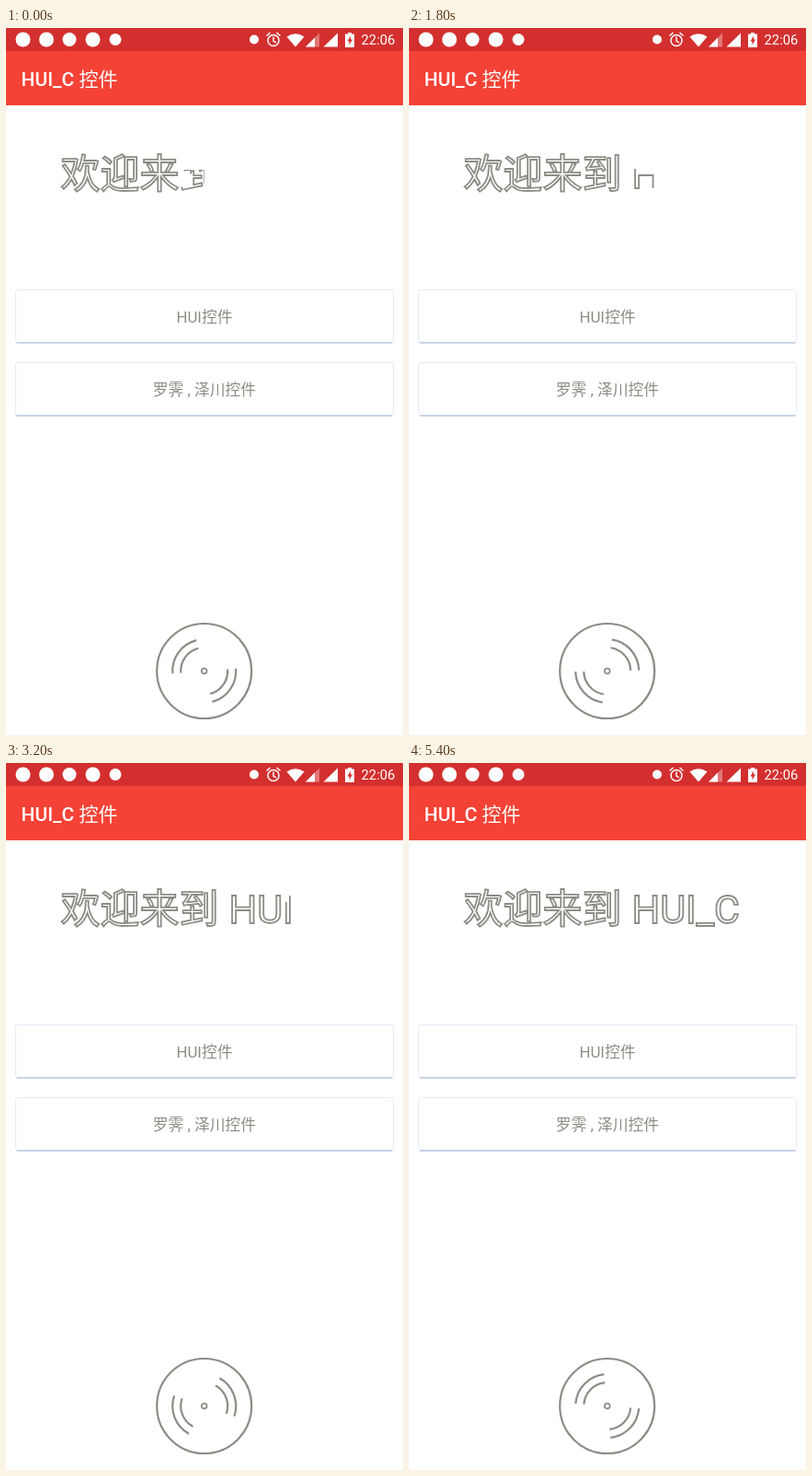
An HTML page for the animation above (5500 ms loop, 432 by 768 pixels).

```html
<!DOCTYPE html>
<html lang="zh-CN">
<head>
<meta charset="utf-8">
<style>
  html, body { margin: 0; width: 100%; height: 100%; overflow: hidden; background: #fff; }
  svg { display: block; }
  text { font-family: Roboto, "Noto Sans CJK SC", "Noto Sans CJK", sans-serif; white-space: pre; }
  .label { font-size: 16.8px; fill: #8c8c82; text-anchor: middle; }
  .line { fill: none; stroke: #8c8c84; }
  .title { font-size: 43px; stroke-width: 1.8; }
  .white { fill: #fff; }
  .thin { fill: none; stroke: #fff; stroke-width: 1.5; }
  .card { fill: #fff; stroke: #e6ebf5; }
  .shade { fill: none; stroke: #bccbe2; stroke-width: 1.5; }
</style>
</head>
<body>
<svg width="432" height="768" viewBox="0 0 432 768">
  <rect width="432" height="25.5" fill="#d32f2f"/>
  <rect y="25" width="432" height="59" fill="#f44336"/>

  <g class="white">
    <circle cx="18.5" cy="12.5" r="8"/>
    <circle cx="44" cy="12.5" r="8"/>
    <circle cx="69" cy="12.5" r="7.5"/>
    <circle cx="94.5" cy="12.5" r="8"/>
    <circle cx="119" cy="12.5" r="6.5"/>
    <circle cx="270" cy="12.5" r="5"/>
    <path d="M305.500 9.500Q315 3 324.500 9.500L315 20.500Z"/>
    <path d="M326 20.500L341 5.500V20.500Z" opacity=".35"/>
    <path d="M326 20.500L336 10.500V20.500Z"/>
    <path d="M345.500 20.500L361 5.500V20.500Z"/>
    <path d="M372 5h4v1.500h3V21h-10V6.500h3Z"/>
    <text x="386.500" y="18" font-size="14.800">22:06</text>
    <text x="16.500" y="62.500" font-size="21" font-weight="500">HUI_C <tspan font-weight="400">控件</tspan></text>
  </g>
  <path d="M375 8.500l-3.500 6h2v4l3.500-6h-2Z" fill="#d32f2f"/>
  <g class="thin">
    <circle cx="291" cy="13.500" r="6"/>
    <path d="M291 9.500v4.500l3 2M283.500 8.500l4-3.500M298.500 8.500l-4-3.500"/>
  </g>

  <g id="title" class="line title"></g>

  <rect class="card" x="10.500" y="284.500" width="411" height="57" rx="2"/>
  <path class="shade" d="M11.500 342H420.500"/>
  <text class="label" x="216" y="319.500">HUI控件</text>
  <rect class="card" x="10.500" y="363.500" width="411" height="57" rx="2"/>
  <path class="shade" d="M11.500 421.200H420.500"/>
  <text class="label" x="216" y="399">罗霁 , 泽川控件</text>

  <g class="line" transform="translate(215.700 698.500)" stroke-width="2.200">
    <circle r="51.500"/>
    <circle r="2.900" stroke-width="1.800"/>
    <g id="arcs"></g>
  </g>
</svg>
<script>
const LOOP = 5500, STEP = 100;
const TURN = 821, TURN_SHIFT = 404;
const title = document.getElementById('title');
const arcs = document.getElementById('arcs');

function add(parent, tag, attrs, text = '') {
  const el = document.createElementNS('http://www.w3.org/2000/svg', tag);
  for (const key in attrs) el.setAttribute(key, attrs[key]);
  el.textContent = text;
  return parent.appendChild(el);
}

// Two pairs of grooves, each sweeping 80 degrees.
for (const r of [34.5, 25.5]) {
  for (const turn of [0, 180]) {
    const a = 80 * Math.PI / 180;
    add(arcs, 'path', {
      d: `M${r} 0A${r} ${r} 0 0 1 ${r * Math.cos(a)} ${r * Math.sin(a)}`,
      transform: `rotate(${turn})`
    });
  }
}

add(title, 'text', { x: 59.5, y: 174 }, '欢迎来');

// Glyph, x, outline length, pen travel left when it begins and ends, optional window.
const strokes = [
  ['到', 188.5, 125, 1300, 1175, [188, 154, 27.8, 28]],
  ['到', 188.5, 115, 1175, 930, [188, 130, 27.8, 24]],
  ['到', 188.5, 95, 930, 632, [215.8, 130, 18, 52]],
  ['H', 242.5, 168, 632, 417],
  ['U', 273.2, 154, 417, 258],
  ['I', 301, 72, 258, 189],
  ['_', 312.7, 47, 189, 146],
  ['C', 332.1, 148, 146, 0]
].map(([glyph, x, length, from, to, box]) => {
  let parent = title;
  if (box) {
    const [left, top, width, height] = box;
    parent = add(title, 'svg', { x: left, y: top, width, height, viewBox: box.join(' '), overflow: 'hidden' });
  }
  return { el: add(parent, 'text', { x, y: 174 }, glyph), length, from, to };
});

function draw(now) {
  const t = Math.floor(now % LOOP / STEP) * STEP;

  // The pen slows to a stop at 5.4 s.
  const left = 42 * Math.max(0, 5.4 - t / 1000) ** 2;
  for (const { el, length, from, to } of strokes) {
    const part = Math.min(1, (from - left) / (from - to));
    el.style.display = part > 0 ? '' : 'none';
    el.style.strokeDasharray = part < 1 ? `${Math.max(0, part) * length} 999` : 'none';
  }

  // Each turn eases in and out.
  const u = (t + TURN_SHIFT) % TURN / TURN;
  arcs.setAttribute('transform', `rotate(${180 * (1 - Math.cos(Math.PI * u))})`);
  requestAnimationFrame(tick);
}

const start = performance.now();
function tick() { draw(performance.now() - start); }
tick();
</script>
</body>
</html>
```
